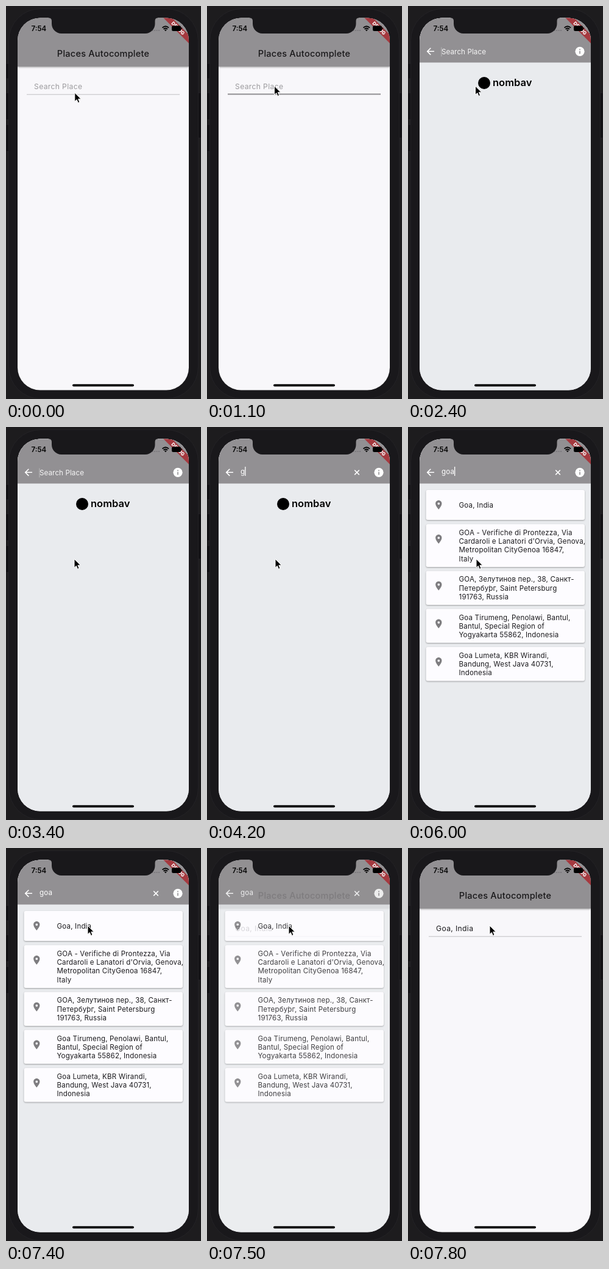
Animation of 320x643 px, one loop 8 s. Source, as an HTML page:

```html
<!DOCTYPE html>
<html lang="en">
<head>
<meta charset="utf-8">
<title>Places autocomplete</title>
<style>
  html, body { margin: 0; height: 100%; overflow: hidden; background: #1d1c1e; }
  svg { display: block; width: 100%; height: 100%; font-family: Inter, "Noto Sans", sans-serif; }
  .bar { fill: #929093; }
  .title { font-size: 14.5px; font-weight: 500; letter-spacing: .25px; fill: #19181a; }
  .field { font-size: 12.1px; letter-spacing: .37px; }
  .query { font-size: 11.6px; letter-spacing: .1px; fill: #fff; }
  .row { font-size: 11.5px; letter-spacing: .2px; fill: #1b1a1d; }
  .card { fill: #fdfcff; filter: drop-shadow(0 1px 1px #0005); }
  .line { fill: none; stroke: #fff; stroke-width: 1.6; }
</style>
</head>
<body>
<svg viewBox="0 0 320 643">
  <defs>
    <clipPath id="glass"><rect x="19" y="19.5" width="281" height="609" rx="37"/></clipPath>
    <path id="pin" fill="#7e7d80" fill-rule="evenodd" d="M0-10C-3.87-10-7-6.87-7-3c0 5.25 7 13 7 13s7-7.75 7-13c0-3.87-3.13-7-7-7zm0 9.5a2.5 2.5 0 1 1 0-5 2.5 2.5 0 0 1 0 5z"/>
  </defs>

  <!-- device -->
  <g fill="#111013" stroke="#29282b" stroke-width=".7">
    <rect x="0" y="94" width="6" height="25" rx="1.5"/>
    <rect x="0" y="142" width="6" height="44" rx="1.5"/>
    <rect x="0" y="194" width="6" height="44" rx="1.5"/>
    <rect x="314" y="142" width="6" height="74" rx="1.5"/>
    <rect x="4.500" y="4.500" width="311" height="638" rx="52" fill="#19181b"/>
  </g>

  <g clip-path="url(#glass)">
    <g id="home">
      <rect x="19" y="19" width="281" height="610" fill="#f8f7fa"/>
      <rect class="bar" x="19" y="19" width="281" height="80" style="filter:drop-shadow(0 1px 1.5px #0006)"/>
      <text class="title" x="159.600" y="83" text-anchor="middle">Places Autocomplete</text>
      <text class="field" id="place" x="46" y="136.300"></text>
      <rect id="underline" x="34" width="251"/>
    </g>

    <g id="search">
      <rect x="19" y="19" width="281" height="610" fill="#e9ebee"/>
      <rect class="bar" x="19" y="19" width="281" height="73.500"/>
      <path class="line" d="M43 74.300H32M37.300 68.700L31.700 74.300L37.300 79.900"/>
      <path id="clear" class="line" d="M242.200 70.500l7.600 7.600M249.800 70.500l-7.600 7.600"/>
      <circle cx="282" cy="74.300" r="7.600" fill="#fff"/>
      <path class="bar" d="M281.200 70.300h1.600v1.600h-1.600zM281.200 73.500h1.600v4.700h-1.600z"/>
      <text class="query" id="hint" x="55" y="78.700">Search Place</text>
      <text class="query" id="query" x="55" y="76.500"></text>
      <rect id="caret" width="1.300" height="15" fill="#fff"/>
      <g id="brand">
        <circle cx="125" cy="126" r="10"/>
        <text x="139" y="130.800" font-size="16.500" font-weight="600">nombav</text>
      </g>
      <path id="spinner" fill="none" stroke="#8f8e91" stroke-width="3"/>
      <g id="results"></g>
    </g>

    <!-- status bar -->
    <g transform="translate(282.300 36.300) rotate(45)">
      <rect x="-40" y="-5" width="80" height="10" fill="#a5393f"/>
      <text y="2.800" text-anchor="middle" font-size="7.800" font-weight="800" fill="#fff">DEBUG</text>
    </g>
    <text x="41.500" y="41" font-size="11.500" font-weight="600">7:54</text>
    <path d="M240 40h12" stroke="#6c6a6e" stroke-width="1.600" stroke-dasharray="1.600 1.800"/>
    <g fill="none" stroke="#000" stroke-width="1.700">
      <path d="M256.500 35.600q5.300-4.700 10.600 0M258.500 37.900q3.300-2.800 6.600 0"/>
    </g>
    <path d="M259.900 39.300q1.900-1.500 3.800 0l-1.900 2z"/>
    <rect x="272" y="32.300" width="15" height="8.700" rx="2.500"/>
    <rect x="287.500" y="35" width="1.300" height="3.200" rx=".6"/>
    <rect x="109" y="618.700" width="101" height="3.800" rx="1.900"/>
  </g>

  <path fill="#19181b" d="M70 19h179v.5q-4.500 0-4.500 5v4.500a16 16 0 0 1-16 16H91a16 16 0 0 1-16-16v-4.500q0-5-5-5z"/>
  <path id="mouse" stroke="#fff" stroke-width="1" stroke-linejoin="round" d="M0 0V14.300l3.300-3.100 2.200 5.200 2.500-1.100-2.200-5.100h4.500z"/>
</svg>

<script>
const LOOP = 8000, STEP = 100;
const el = Object.fromEntries([...document.querySelectorAll("[id]")].map(e => [e.id, e]));
const clamp = v => Math.max(0, Math.min(1, v));
const ramp = (t, from, to) => clamp((t - from) / (to - from));
const ease = u => u * u * (3 - 2 * u);
const show = (e, opacity) => e.setAttribute("opacity", +opacity);
const set = (e, attrs) => { for (const k in attrs) e.setAttribute(k, attrs[k]); };

// top, height, first baseline, lines
const cards = [
  [103, 49, 132.2, "Goa, India"],
  [159, 70, 177, "GOA - Verifiche di Prontezza, Via|Cardaroli e Lanatori d'Orvia, Genova,|Metropolitan CityGenoa 16847,|Italy"],
  [235.5, 55.5, 253.4, "GOA, Зелутинов пер., 38, Санкт-|Петербу́рг, Saint Petersburg|191763, Russia"],
  [297.5, 55.5, 315.5, "Goa Tirumeng, Penolawi, Bantul,|Bantul, Special Region of|Yogyakarta 55862, Indonesia"],
  [360, 55.5, 378, "Goa Lumeta, KBR Wirandi,|Bandung, West Java 40731,|Indonesia"],
];
el.results.innerHTML = cards.map(([y, h, base, text]) => {
  const lines = text.split("|");
  const pinY = lines.length > 3 ? y + 24.500 : y + 24.500;
  return `<rect class="card" x="29.500" y="${y}" width="260.500" height="${h}" rx="3"/>
    <use href="#pin" transform="translate(50.300 ${pinY}) scale(.74)"/>` +
    lines.map((s, i) => `<text class="row" x="83.500" y="${base + i * 14.2}">${s}</text>`).join("");
}).join("");

// The caret toggles every 500 ms with a short fade; typing keeps it lit.
function caretOpacity(t) {
  const shift = t < 4050 ? 1350 : 4650;
  if (t >= 4050 && t < 5150) return 1;
  const n = Math.floor((t - shift) / 500);
  const fade = 1 - (1 - clamp((t - shift - n * 500) / 250)) ** 2;
  return n % 2 ? 1 - fade : n ? fade : 1;
}

// Pointer moves: start, end, x, y
const moves = [[50, 200, 110.5, 131], [2400, 2900, 112, 216], [6650, 7000, 134, 127]];
function pointer(t) {
  let x = 112.8, y = 142;
  for (const [from, to, mx, my] of moves) {
    const u = ease(ramp(t, from, to));
    x += (mx - x) * u;
    y += (my - y) * u;
  }
  return `translate(${x} ${y})`;
}

function spinnerArc(t) {
  const u = ramp(t, 5550, 5800), r = 13.3;
  const start = -90 + 30 * u * u, end = start + 215 * u;
  const at = deg => {
    const a = deg * Math.PI / 180;
    return `${160 + r * Math.cos(a)} ${121.5 + r * Math.sin(a)}`;
  };
  return `M${at(start)}A${r} ${r} 0 ${+(end - start > 180)} 1 ${at(end)}`;
}

function draw(t) {
  const typed = t < 4050 ? 0 : t < 4400 ? 1 : t < 4500 ? 2 : 3;
  const loading = t >= 5600 && t < 6000;

  const picked = t >= 7300;
  el.place.textContent = picked ? "Goa, India" : "Search Place";
  el.place.setAttribute("fill", picked ? "#1b1a1d" : "#9c9b9e");
  const focus = picked ? 0 : ramp(t, 700, 900);
  set(el.underline, { y: 144.3 - focus, height: 1 + focus, fill: focus ? "#929093" : "#c0bfc2" });

  show(el.search, ramp(t, 1200, 1400) - ramp(t, 7450, 7750));
  el.query.textContent = "goa".slice(0, typed);
  show(el.hint, .92 * (1 - ramp(t, 4050, 4200)));
  show(el.clear, typed > 0);
  set(el.caret, {
    x: typed ? 55 + el.query.getComputedTextLength() : 54.2,
    y: typed ? 65 : 67.5,
    opacity: caretOpacity(t) * (typed ? 1 : .8),
  });
  show(el.brand, t < 5600);
  show(el.spinner, loading);
  el.spinner.setAttribute("d", spinnerArc(t));
  show(el.results, t >= 6000);
  el.mouse.setAttribute("transform", pointer(t));
}

function tick() {
  draw(Math.floor(performance.now() % LOOP / STEP) * STEP);
  requestAnimationFrame(tick);
}
tick();
</script>
</body>
</html>
```
